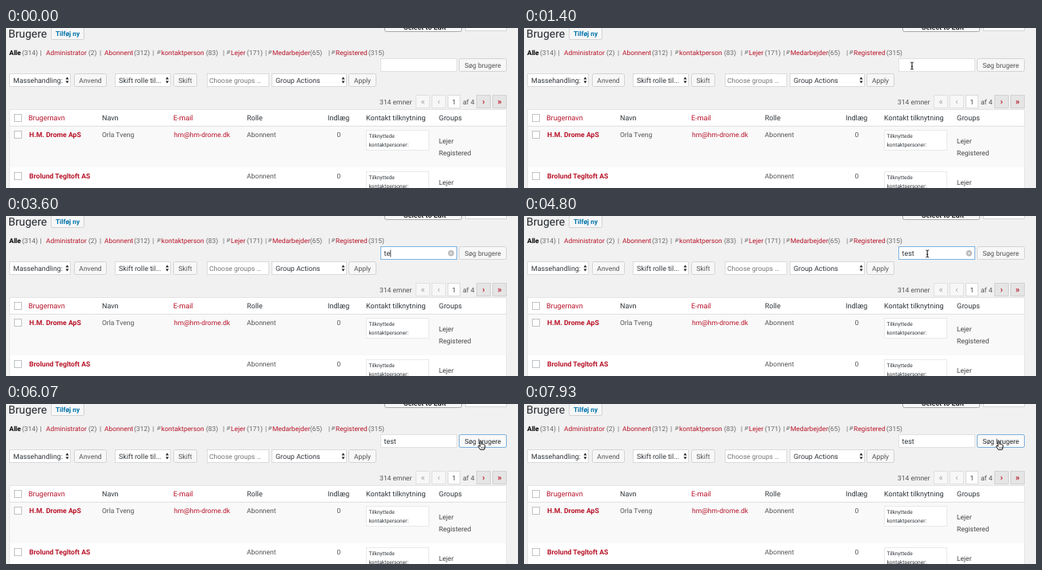
Write an HTML page that moves like this. It is 640 px wide and 201 px high and loops after 8000 ms.

```html
<!DOCTYPE html>
<html lang="da">
<head>
<meta charset="utf-8">
<title>Brugere</title>
<style>
  html, body { margin: 0; width: 100%; height: 100%; overflow: hidden; background: #f1f1f1; }
  svg { display: block; width: 100%; height: 100%; }
  text { font: 8.5px Roboto, Arial, sans-serif; white-space: pre; text-rendering: geometricPrecision; }
</style>
</head>
<body>
<svg id="stage" viewBox="0 0 640 201" preserveAspectRatio="none"></svg>
<script>
const RED = '#b8152a', INK = '#32373c', GREY = '#666', BLUE = '#6ea8dc';
const LOOP = 8000, BLINK = 530;
const parts = [];
const add = s => parts.push(s);

function text(x, y, s, { fill = INK, size = 8.5, weight = 400, anchor = 'start', id = '' } = {}) {
  add(`<text id="${id}" x="${x}" y="${y}" fill="${fill}" text-anchor="${anchor}" style="font-size:${size}px;font-weight:${weight}">${s}</text>`);
}
function box(x, y, w, h, { fill = '#fff', stroke = '#d5d5d5', r = 0, id = '' } = {}) {
  add(`<rect id="${id}" x="${x + .5}" y="${y + .5}" width="${w - 1}" height="${h - 1}" rx="${r}" fill="${fill}" stroke="${stroke}" stroke-width=".8"/>`);
}
function button(x, y, w, label, id) {
  box(x, y, w, 17, { fill: '#f7f7f7', stroke: '#ccc', r: 2, id });
  text(x + w / 2, y + 11.6, label, { fill: '#555', anchor: 'middle', id: id ? id + 'Label' : '' });
}
function select(x, w, label) {
  box(x, 57, w, 17);
  text(x + 5, 68.6, label, { size: 8.8 });
  const a = x + w - 4.5;
  add(`<path d="M${a - 2} 64.6l2-3 2 3zM${a - 2} 66.4l2 3 2-3z" fill="#222"/>`);
}
function pager(x, mark, active) {
  box(x, 84, 18, 17, { fill: active ? '#e5e5e5' : '#f7f7f7', stroke: active ? '#ccc' : '#ddd' });
  text(x + 9, 95.8, mark, { fill: active ? RED : '#a0a5aa', size: 11, anchor: 'middle', weight: active ? 500 : 400 });
}
const check = y => box(10, y, 10, 10, { stroke: '#b4b9be' });

// Heading and the cut-off controls above
text(3, 12, 'Brugere', { size: 13.9, fill: '#23282d' });
box(56, -1, 42, 16, { fill: '#f7f7f7', stroke: '#ccc', r: 1.5 });
text(77, 10, 'Tilføj ny', { fill: '#0073aa', weight: 600, size: 8.3, anchor: 'middle' });
box(473, -12, 97, 17, { fill: '#f7f7f7', stroke: '#999', r: 2 });
text(497, 2, 'Select to Edit', { size: 9, weight: 500, fill: '#111' });
box(574, -12, 52, 16, { stroke: '#ccc' });

// Role filters: x, label, count x, count, separator x, has icon
[
  [4, 'Alle', 20, 314, 42.5], [50, 'Administrator', 103, 2, 117],
  [123, 'Abonnent', 160, 312, 183], [194, 'kontaktperson', 250, 83, 271, 1],
  [281, 'Lejer', 301, 171, 324, 1], [333, 'Medarbejder', 380, 65, 403, 1],
  [412, 'Registered', 453, 315, 0, 1]
].forEach(([x, label, cx, count, bar, icon], i) => {
  text(x, 33.6, label, { fill: i ? RED : '#000', weight: i ? 400 : 600, size: 8.4 });
  text(cx, 33.6, `(${count})`, { fill: GREY, size: 8.4 });
  if (bar) text(bar, 33.6, '|', { fill: GREY });
  if (icon) add(`<path d="M${x - 5} 33l2-2.6m-1-1.6h2.8l-.9 2.6h-2z" fill="none" stroke="#666" stroke-width=".7"/>`);
});

// Search
box(468, 38, 96, 17, { id: 'field' });
text(472.5, 50.4, '', { size: 9, id: 'query' });
add('<path id="caret" d="M0 42.5v9" stroke="#222" stroke-width=".8"/>');
add('<g id="clear"><circle cx="556.3" cy="46.8" r="3.7" fill="#b9b9b9"/><path d="M554.8 45.3l3 3m0-3l-3 3" stroke="#fff" stroke-width=".9"/></g>');
button(566, 38, 60, 'Søg brugere', 'go');

// Bulk actions
select(4, 77, 'Massehandling:');
button(85, 57, 41, 'Anvend');
select(136, 70, 'Skift rolle til...');
button(209, 57, 30, 'Skift');
box(251, 57, 78, 17);
text(254, 68.6, 'Choose groups …', { fill: '#777' });
select(332, 94, 'Group Actions');
button(428, 57, 35, 'Apply');

// Paging
text(467, 95.6, '314 emner', { fill: '#555' });
pager(512, '«');
pager(532, '‹');
box(552, 84, 16, 17);
text(560, 95.6, '1', { anchor: 'middle' });
text(571, 95.6, 'af 4', { fill: '#555' });
pager(588, '›', true);
pager(608, '»', true);

// Table
box(4, 102, 622, 110, { stroke: '#e1e1e1' });
add('<path d="M4.8 123h620.4v52H4.8z" fill="#f9f9f9"/><path d="M4 123.3h622" stroke="#ddd" stroke-width=".9"/>');
check(108);
[[28, 'Brugernavn', 1], [120, 'Navn'], [209, 'E-mail', 1], [301, 'Rolle'], [402, 'Indlæg'],
 [450, 'Kontakt tilknytning'], [541, 'Groups']]
  .forEach(([x, s, link]) => text(x, 116, s, { size: 9, fill: link ? RED : INK }));

function row(y, user, name, mail) {
  check(y + 6);
  text(29, y + 14, user, { fill: RED, weight: 600, size: 8.7 });
  text(120, y + 14, name, { fill: '#555' });
  text(210, y + 14, mail, { fill: RED });
  text(301, y + 14, 'Abonnent', { fill: '#555' });
  text(416, y + 14, '0', { fill: '#555', anchor: 'middle' });
  box(450, y + 5, 79, 26, { stroke: '#e5e5e5' });
  text(453.5, y + 14.6, 'Tilknyttede', { size: 6.6 });
  text(453.5, y + 26, 'kontaktpersoner:', { size: 6.6 });
  text(541, y + 22, 'Lejer', { fill: '#444' });
  text(541, y + 36.6, 'Registered', { fill: '#444' });
}
row(123, 'H.M. Drome ApS', 'Orla Tveng', 'hm@hm-drome.dk');
row(175, 'Brolund Tegltoft AS', '', '');

// Pointers, each with its hot spot at 0,0
add(`<circle id="ring" r="17.7" fill="none" stroke="#111" stroke-width="2.2"/>
<g id="arrow"><path d="M0 0v10l2.3-2.1 1.6 3.6 1.7-.8-1.6-3.5h3.1z" fill="#000" stroke="#fff" stroke-width=".7"/></g>
<g id="beam" fill="none"><path d="M-1.8-4.5q1.8 0 1.8 1.3v6.4q0 1.3-1.8 1.3M1.8-4.5q-1.8 0-1.8 1.3M1.8 4.5q-1.8 0-1.8-1.3M-1 .9h2" stroke="#111"/></g>
<g id="hand"><path d="M-1 0q1-1 1.8 0v3.3q1-.5 1.6.3 1-.4 1.5.4 1.2-.2 1.4.9v2.2l-1 3.2h-5l-2.5-3.8q-.4-1.3 1-1l1.2 1z" fill="#fff" stroke="#000" stroke-width=".9"/>
<path d="M.9 6.8v2M2.4 6.8v2M3.8 6.8v2" stroke="#000" stroke-width=".5"/></g>`);

const stage = document.getElementById('stage');
stage.innerHTML = parts.join('');
const $ = id => document.getElementById(id);
const show = (id, on) => $(id).setAttribute('visibility', on ? 'visible' : 'hidden');
const within = (t, a, b) => t >= a && t < b;

// Pointer path: time, x, y
const path = [[0, 535, -16], [200, 535, -16], [900, 485, 47.5], [4600, 485, 47.5], [5350, 593.5, 47],
  [6400, 593.5, 47], [6730, 591.5, 48.5], [7600, 591.5, 48.5], [7900, 593.5, 47]];
const strokes = [3300, 3530, 3730, 3900];
const FOCUS = 1930, BLUR = 5640;

function pointer(t) {
  const i = path.findIndex(p => p[0] > t);
  if (i < 0) return path.at(-1).slice(1);
  const [a, x, y] = path[i - 1], [b, u, v] = path[i];
  const k = (t - a) / (b - a), e = k * k * (3 - 2 * k);
  return [x + (u - x) * e, y + (v - y) * e];
}
function glow(id, on, idle) {
  $(id).setAttribute('stroke', on ? BLUE : idle);
  $(id).style.filter = on ? 'drop-shadow(0 0 .7px rgba(30,140,190,.5))' : 'none';
}

function draw(t) {
  const [x, y] = pointer(t);
  const overField = within(x, 468, 564) && within(y, 38, 55);
  const overGo = within(x, 566, 626) && within(y, 38, 55);
  const typing = within(t, strokes[0], 4600);
  const kind = typing ? '' : overField ? 'beam' : overGo ? 'hand' : 'arrow';
  for (const id of ['arrow', 'beam', 'hand', 'ring']) {
    show(id, id === kind);
    $(id).setAttribute('transform', `translate(${x} ${y})`);
  }
  const pressed = within(t, 5540, 5700);
  show('ring', within(t, 1870, 2000) || pressed);

  const typed = strokes.filter(s => s <= t).length;
  const focused = within(t, FOCUS, BLUR);
  const query = $('query');
  query.textContent = 'test'.slice(0, typed);
  show('clear', typed && overField);
  glow('field', focused, '#ddd');
  glow('go', t >= BLUR, overGo ? '#999' : '#ccc');
  $('go').setAttribute('fill', pressed ? '#eee' : overGo ? '#fafafa' : '#f7f7f7');
  $('goLabel').setAttribute('fill', overGo ? '#23282d' : '#555');

  const since = t - (typed ? strokes[typed - 1] : FOCUS);
  show('caret', focused && Math.floor(since / BLINK) % 2 === 0);
  $('caret').setAttribute('transform', `translate(${473 + (typed ? query.getComputedTextLength() : 0)} 0)`);
}

function tick(now) {
  draw(now % LOOP);
  requestAnimationFrame(tick);
}
draw(0);
requestAnimationFrame(tick);
</script>
</body>
</html>
```
